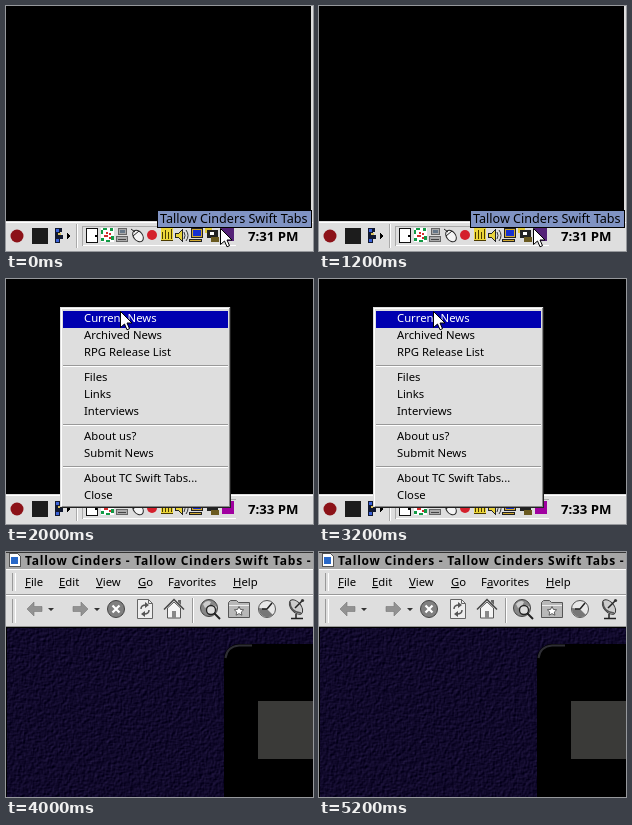
These frames come from a looping animation (307x245 px, 6000 ms). An HTML page with a canvas:

```html
<!DOCTYPE html>
<html lang="en">
<head>
<meta charset="utf-8">
<title>Tray menu</title>
<style>
  html, body { margin: 0; width: 100%; height: 100%; overflow: hidden; background: #000; }
  .scene { position: absolute; left: 0; top: 0; width: 307px; height: 245px; overflow: hidden; background: #000; opacity: 0; }
  .scene > * { position: absolute; left: 0; top: 0; }
  svg { display: block; shape-rendering: crispEdges; }
  text { font: 11.3px "Noto Sans", sans-serif; white-space: pre; }
  .tip { font-size: 12.6px; }
  .clock { font-size: 13.2px; font-weight: 700; }
  .title { font-size: 12px; font-weight: 700; letter-spacing: .75px; }
  .smooth { shape-rendering: auto; }
</style>
</head>
<body>
<div class="scene">
  <svg width="307" height="245">
    <defs>
      <path id="cursor" class="smooth" d="M.5 .5V16.5L4.5 13L7 18.8L9.5 17.7L7 12H12Z" fill="#fff" stroke="#000"/>
      <g id="bar">
        <rect y="215" width="307" height="30" fill="#dedede"/>
        <path d="M0 216.5H307" stroke="#fff"/>
        <circle class="smooth" cx="11" cy="230" r="6.5" fill="#8c1218"/>
        <rect x="26" y="222" width="16" height="16" fill="#1c1c1c"/>
        <path d="M49 222h7v4h-2v3h3v4h-3v4h-5z" fill="#101830"/>
        <path d="M50 223h3v3h-3zM50 233h3v3h-3z" fill="#3b62d8"/>
        <path d="M52 227h3v2h-3z" fill="#d8c060"/>
        <path d="M61 227l4 3l-4 3z"/>
        <path d="M71.5 218V242" stroke="#fff"/>
        <path d="M70.5 218V242M76.5 240V220.500H230" fill="none" stroke="#aaa"/>
        <path d="M77 239.500H230" stroke="#fff"/>
        <!-- door -->
        <path d="M80.5 222.5h11v14h-11z" fill="#fff" stroke="#111"/>
        <path d="M89 229h2v2h-2z"/>
        <!-- runner -->
        <path d="M95 222h13v14h-13z" fill="#fff"/>
        <path d="M95 224h2v4h-2zM97 222h4v2h-4zM104 222h3v3h-3zM95 232h3v3h-3zM105 230h3v4h-3zM100 234h4v2h-4z" fill="#129a45"/>
        <path d="M100 226h2v2h-2zM103 227h2v2h-2zM98 229h4v2h-4zM103 231h2v2h-2z" fill="#d32c2c"/>
        <!-- computers -->
        <path d="M112.5 222.5h8v6h-8zM110.5 230.5h11v5h-11z" fill="#aaa" stroke="#666"/>
        <path d="M114 224h5v3h-5z" fill="#678"/><path d="M112 233h8" stroke="#444"/>
        <!-- mouse -->
        <g class="smooth"><ellipse cx="132" cy="230" rx="4.5" ry="6.5" transform="rotate(-38 132 230)" fill="#f4f4f4" stroke="#222"/>
        <path d="M125 223l4 3M127 230l6-5" stroke="#222" fill="none"/></g>
        <circle class="smooth" cx="146" cy="229" r="5" fill="#d4202c"/>
        <!-- meters -->
        <path d="M155 222h12v13h-12z" fill="#ecd63a"/>
        <path d="M156.5 226v7M159.5 224v9M162.5 226v7M165.5 223v10M155 234.5h12" stroke="#4a3a00"/>
        <!-- speaker -->
        <path d="M169.5 227.5h3l4-4v12l-4-4h-3z" fill="#e8d23c" stroke="#222"/>
        <path class="smooth" d="M178 226q2 3.500 0 7M180 224q4 5.500 0 11" fill="none" stroke="#333"/>
        <!-- monitor -->
        <path d="M185.500 222.500h11v9h-11zM183.500 233.500h12v2h-12z" fill="#d0a830" stroke="#222"/>
        <path d="M187 224h8v6h-8z" fill="#1530d0"/>
        <!-- camera -->
        <path d="M199 222h7v5h-7z" fill="#e4cc38"/><path d="M201 224h11v8h-11z" fill="#222"/>
        <path d="M204 226h4v3h-4z" fill="#fff"/><path d="M205 231h8v5h-8z" fill="#6a5a20"/>
      </g>
    </defs>
    <path d="M306 0V215" stroke="#ddd" stroke-width="2"/>
    <use href="#bar"/>
    <path d="M215 222h13v13h-13z" fill="#542277"/>
    <text class="clock" x="242" y="235">7:31 PM</text>
    <rect x="151.500" y="204.500" width="154" height="17" fill="#8093c3" stroke="#000"/>
    <text class="tip" x="154" y="217">Tallow Cinders Swift Tabs</text>
    <use href="#cursor" x="214" y="222"/>
  </svg>
</div>

<div class="scene">
  <svg width="307" height="245">
    <use href="#bar"/>
    <path d="M216 222h12v13h-12z" fill="#a000a0"/>
    <text class="clock" x="242" y="235">7:33 PM</text>
    <rect x="54" y="28" width="171" height="201" fill="#222"/>
    <rect x="54" y="28" width="170" height="200" fill="#dedede"/>
    <path d="M55.500 227V29.500H223" fill="none" stroke="#fff"/>
    <path d="M56 227.500H223.500V29" fill="none" stroke="#888"/>
    <rect x="57" y="32" width="165" height="17" fill="#0000b0"/>
    <g id="menu"></g>
    <use href="#cursor" x="114" y="32"/>
  </svg>
</div>

<div class="scene">
  <canvas id="cloth" width="307" height="245"></canvas>
  <svg width="307" height="245">
    <rect class="smooth" x="218" y="92" width="110" height="180" rx="15"/>
    <path class="smooth" d="M219.500 106Q221 94.500 233 93.500H246" fill="none" stroke="#2e2e34" stroke-width="2"/>
    <rect x="252" y="149" width="58" height="58" fill="#3a3a38"/>
    <rect width="307" height="76" fill="#dedede"/>
    <rect width="307" height="17" fill="#a6a6a6"/>
    <path d="M0 .5H307" stroke="#333"/>
    <path d="M0 17.500H307M0 43.500H307M9.500 21V39M9.500 47V71" stroke="#fff"/>
    <path d="M0 42.500H307M0 74.500H307M6.500 21V39M6.500 47V71M186.500 46V71" stroke="#999"/>
    <path d="M187.500 46V71" stroke="#fff"/>
    <path d="M0 75.500H307M.5 75V245" stroke="#000"/>
    <path d="M3.500 1.500h8l3 3v10h-11z" fill="#fff" stroke="#555"/>
    <rect x="5" y="5" width="7" height="7" fill="#2868c8"/>
    <text class="title" x="19" y="13">Tallow Cinders - Tallow Cinders Swift Tabs -</text>
    <g id="words"></g>
    <g class="smooth">
      <path id="back" d="M21 57l7-7v4.500h8v5h-8v4.500z" fill="#929292" stroke="#777" stroke-width=".6"/>
      <use href="#back" transform="matrix(-1 0 0 1 103 0)"/>
      <path d="M42 56h6l-3 3zM88 56h6l-3 3z" fill="#333"/>
      <!-- stop -->
      <circle cx="110" cy="57" r="8.500" fill="#808080" stroke="#444"/>
      <path d="M106.500 53.500l7 7m0-7l-7 7" stroke="#fff" stroke-width="2.200"/>
      <!-- refresh -->
      <path d="M131.500 47.500h11l4 4v15h-15z" fill="#eee" stroke="#666"/>
      <path d="M142.500 47.500v4h4" fill="none" stroke="#666"/>
      <path d="M135 57q0-4 5-4M143 58q0 4-5 4" fill="none" stroke="#555" stroke-width="1.500"/>
      <path d="M139 50l4 3l-4 3zM139 59l-4 3l4 3z" fill="#555"/>
      <!-- home -->
      <path d="M161.500 56v10h13v-10l-6.500-6z" fill="#f4f4f4" stroke="#555"/>
      <path d="M158 57.500l10-10l10 10" fill="none" stroke="#444" stroke-width="1.500"/>
      <path d="M166 59h4v7h-4z" fill="#888"/><path d="M172 48h3v5l-3-3z" fill="#666"/>
      <!-- search -->
      <circle cx="203" cy="56" r="8.500" fill="#888" stroke="#444"/>
      <path d="M197 52q4-5 8-2l-2 4l-4 2zM207 53l4 2l-2 5l-3-2z" fill="#ccc"/>
      <circle cx="205" cy="58" r="4.500" fill="#ddd" stroke="#222" stroke-width="1.300"/>
      <path d="M208 61l6 6" stroke="#222" stroke-width="2"/>
      <!-- favourites -->
      <path d="M222.500 65.500v-15l2-2h6l2 2h11v15z" fill="#b8b8b8" stroke="#555"/>
      <path d="M223 53.500h20" stroke="#eee"/>
      <path d="M233 54.500l1.400 2.900 3.200.4-2.300 2.200.6 3.200-2.900-1.600-2.900 1.600.6-3.200-2.300-2.200 3.200-.4z" fill="#fff" stroke="#444" stroke-width=".8"/>
      <!-- history -->
      <circle cx="261" cy="57" r="8.500" fill="#e8e8e8" stroke="#555"/>
      <path d="M261 57l-8-1a8.500 8.500 0 0 0 14 7z" fill="#777"/>
      <path d="M261 57l5-6M261 57h-5" stroke="#222" stroke-width="1.500"/>
      <!-- dish -->
      <ellipse cx="290" cy="55" rx="5" ry="8.500" transform="rotate(-40 290 55)" fill="#ccc" stroke="#333"/>
      <path d="M284 50q0 10 11 11" fill="none" stroke="#555" stroke-width="1.500"/>
      <path d="M289 56l7-7M290 62v4M285 66.500h12" stroke="#222" stroke-width="1.500"/>
      <circle cx="296.500" cy="48.500" r="1.600" fill="#333"/>
    </g>
  </svg>
</div>

<script>
const LOOP = 6000;
const $ = id => document.getElementById(id);

function add(parent, tag, attrs, text = '') {
  const el = document.createElementNS('http://www.w3.org/2000/svg', tag);
  for (const k in attrs) el.setAttribute(k, attrs[k]);
  el.textContent = text;
  parent.append(el);
  return el;
}

function buildMenu() {
  const groups = [
    ['Current News', 'Archived News', 'RPG Release List'],
    ['Files', 'Links', 'Interviews'],
    ['About us?', 'Submit News'],
    ['About TC Swift Tabs...', 'Close']
  ];
  let y = 43;
  groups.forEach((items, g) => {
    if (g) {
      add($('menu'), 'path', { d: `M57 ${y - 7.5}H222`, stroke: '#999' });
      add($('menu'), 'path', { d: `M57 ${y - 6.5}H222`, stroke: '#fff' });
      y += 8;
    }
    items.forEach((item, i) => {
      add($('menu'), 'text', { x: 78, y, fill: g + i ? '#000' : '#fff' }, item);
      y += 17;
    });
  });
}

// Each underscore marks the access key that follows it.
function buildWords() {
  const words = [['_File', 19], ['_Edit', 53], ['_View', 90], ['_Go', 132], ['F_avorites', 162], ['_Help', 227]];
  for (const [word, x] of words) {
    const [head, tail] = word.split('_');
    const el = add($('words'), 'text', { x, y: 34 }, head);
    add(el, 'tspan', { 'text-decoration': 'underline' }, tail[0]);
    add(el, 'tspan', {}, tail.slice(1));
  }
}

// Embossed noise, lit from one corner.
function paintCloth() {
  const { width: w, height: h } = $('cloth');
  const ctx = $('cloth').getContext('2d');
  let seed = 17;
  const random = () => (seed = (seed * 16807) % 2147483647) / 2147483647;
  let map = Float32Array.from({ length: w * h }, random);
  const at = (x, y) => map[((y + h) % h) * w + (x + w) % w];
  const each = fn => map.map((_, i) => fn(i % w, Math.floor(i / w)));
  for (let pass = 0; pass < 2; pass++) {
    map = each((x, y) => (at(x, y) * 2 + at(x - 1, y) + at(x + 1, y) + at(x, y - 1) + at(x, y + 1)) / 6);
  }
  const light = each((x, y) => at(x + 1, y + 1) - at(x, y));
  const img = ctx.createImageData(w, h);
  light.forEach((v, i) => {
    img.data.set([16 + v * 55, 9 + v * 45, 42 + v * 75, 255], i * 4);
  });
  ctx.putImageData(img, 0, 0);
}

function play() {
  const scenes = document.querySelectorAll('.scene');
  const n = scenes.length;
  scenes.forEach((scene, i) => {
    const frames = [...Array(n + 1).keys()].map(k => ({
      offset: k / n, opacity: k % n === i ? 1 : 0, easing: 'step-end'
    }));
    scene.animate(frames, { duration: LOOP, iterations: Infinity });
  });
}

buildMenu();
buildWords();
paintCloth();
play();
</script>
</body>
</html>
```
